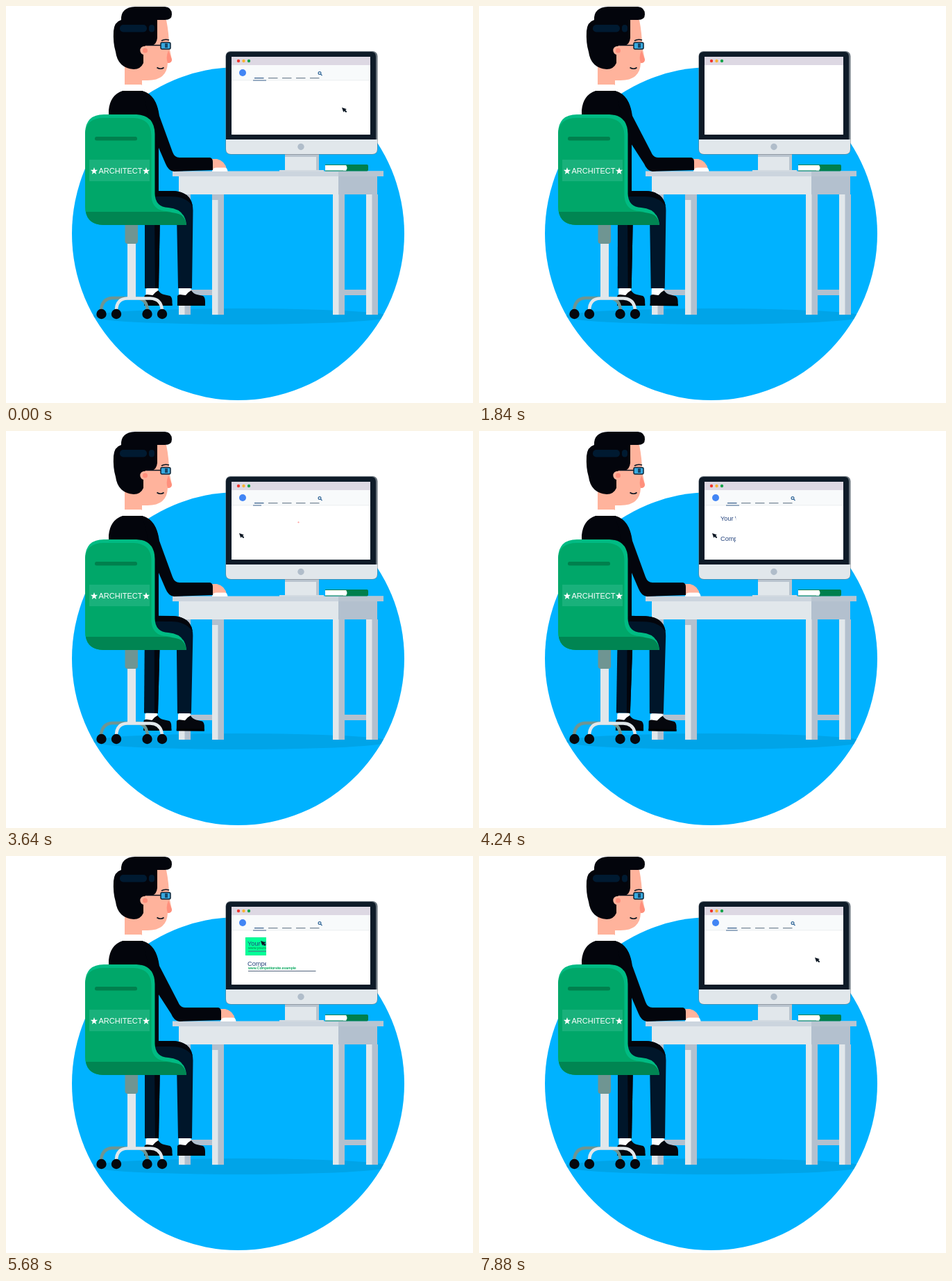
An HTML page that plays this animation: 673x571 px, repeating every 8000 ms.

```html
<!DOCTYPE html>
<html lang="en">
<head>
<meta charset="utf-8">
<title>Search results at a desk</title>
<style>
  html, body { margin: 0; width: 100%; height: 100%; overflow: hidden; background: #fff; }
  svg { display: block; width: 100vw; height: 100vh; }
  text { font-family: "Liberation Sans", Arial, sans-serif; }
  .title { font-size: 9.2px; fill: #24437c; }
  .url { font-size: 5.35px; fill: #00a65a; stroke: #00a65a; stroke-width: .12; }
  .rule { fill: #52647c; }
</style>
</head>
<body>
<svg viewBox="0 0 673 571" preserveAspectRatio="none">
  <defs>
    <clipPath id="disc"><circle cx="334.5" cy="327.5" r="239.5"/></clipPath>
    <clipPath id="screen"><rect x="325" y="73" width="200" height="112"/></clipPath>
    <clipPath id="headerClip"><rect id="headerEdge" x="325" y="85" width="200" height="24"/></clipPath>
    <path id="star" d="M0-5.4 1.3-1.7H5.2L2.1.7 3.2 4.4 0 2.2-3.2 4.4-2.1.7-5.2-1.7H-1.3Z" fill="#fff"/>
    <g id="deskLeg">
      <rect width="9" height="173" fill="#e1e7eb"/>
      <rect x="8.5" width="8.5" height="173" fill="#b3c0ce"/>
    </g>
    <g id="shoe">
      <rect x="2" y="406" width="18" height="12" rx="2" fill="#fff"/>
      <path d="M0 417Q1 415 4 415L12 416Q16 411 20 409Q23 414 28 415L37 417Q40 419 40 425V431H0Z" fill="#05070d"/>
      <path d="M0 428H40V431H0Z" fill="#000"/>
    </g>
  </defs>

  <circle cx="334.5" cy="327.5" r="239.5" fill="#00b2ff"/>
  <ellipse cx="338" cy="446.5" rx="214" ry="11.5" fill="#00a4e8" clip-path="url(#disc)"/>

  <!-- desk -->
  <path d="M266 408H297V416H266ZM488 408H519V416H488Z" fill="#b3c0ce"/>
  <use href="#deskLeg" x="249" y="271"/>
  <use href="#deskLeg" x="297" y="271"/>
  <use href="#deskLeg" x="471" y="271"/>
  <use href="#deskLeg" x="519" y="271"/>
  <path d="M297 271H306V279H297Z" fill="#b3c0ce"/>
  <rect x="249" y="244" width="231" height="27" fill="#e1e7eb"/>
  <rect x="479" y="244" width="56" height="27" fill="#b3c0ce"/>
  <rect x="240" y="237.5" width="304" height="7.5" fill="#ccd5de"/>
  <rect x="479" y="237.5" width="65" height="7.5" fill="#b9c5d1"/>

  <!-- monitor -->
  <rect x="402" y="212" width="49" height="25.5" fill="#e1e7eb"/>
  <path d="M402 212H451V237.500H447V217H402Z" fill="#b9c4ce"/>
  <rect x="394" y="236" width="64" height="2" fill="#d3dae1"/>
  <rect x="316.500" y="65" width="219" height="148.500" rx="7" fill="#6a747d"/>
  <path d="M317 193V73Q317 66 324 66H527Q533 66 533 73V193Z" fill="#0e1b28"/>
  <path d="M317 192H535V206Q535 213 528 213H324Q317 213 317 206Z" fill="#e1e7eb"/>
  <circle cx="425" cy="202.500" r="4.700" fill="#b0bdca"/>
  <rect x="325" y="73" width="200" height="112" fill="#fff"/>
  <rect x="325" y="73" width="200" height="12" fill="#ddd8e3"/>
  <circle cx="335" cy="79" r="2.200" fill="#f0372f"/>
  <circle cx="342.500" cy="79" r="2.200" fill="#f9b233"/>
  <circle cx="350" cy="79" r="2.200" fill="#16a34a"/>

  <g clip-path="url(#screen)">
    <g clip-path="url(#headerClip)">
      <rect x="325" y="85" width="200" height="22" fill="#f8fafb"/>
      <rect x="325" y="106.500" width="200" height=".8" fill="#e7ebee"/>
      <circle cx="341" cy="96" r="5" fill="#4285f4"/>
      <g id="tabs"></g>
      <g fill="none" stroke="#2d6496" stroke-width="1.200">
        <circle cx="452" cy="96.500" r="1.900"/><path d="M453.400 98 455.500 100"/>
      </g>
    </g>
    <rect id="underline" x="356" y="106.500" height="1" fill="#3f6590"/>
    <g id="results"></g>
    <path id="cursor" d="M0 0 6.800 2.300 5.200 3.600 7.300 6 5.900 7.300 3.700 5 2.300 6.700Z" fill="#0b1622"/>
    <g id="cross">
      <circle r="31.500" fill="#ff413f"/>
      <g fill="#fff" transform="rotate(45)">
        <rect x="-20" y="-6.500" width="40" height="13" rx="2"/>
        <rect x="-6.500" y="-20" width="13" height="40" rx="2"/>
      </g>
    </g>
    <g id="check">
      <circle r="31.500" fill="#00d887"/>
      <path d="M-16 1-5 12 16-10" fill="none" stroke="#fff" stroke-width="9"/>
    </g>
  </g>

  <!-- book -->
  <path d="M460 228.500H493V237H460Z" fill="#fff"/>
  <rect x="490" y="228" width="32" height="9.500" rx="2" fill="#007f4c"/>
  <path d="M460 228H492V229H460ZM460 236.500H492V237.500H460Z" fill="#007f4c"/>
  <path d="M486 229H490Q493 233 490 236.500H486Z" fill="#fff"/>

  <!-- head -->
  <path d="M171 80H196V114H171Z" fill="#ffb39c"/>
  <path d="M190 20H231Q235 40 235 58L239 77Q239 82 233 82Q232 107 204 107H190Z" fill="#ffb39c"/>
  <path d="M234 64 239 77Q239 82 233 82Q230 74 234 64Z" fill="#ff8f7c"/>
  <path d="M166 20Q165 2 186 1H229Q239 2 239 12Q239 20 229 20H218V46Q217 56 209 57Q203 54 198 60V82Q194 91 184 91Q161 89 158 66Q154 53 155 36Q156 23 166 20Z" fill="#03050c"/>
  <rect x="164" y="27" width="39" height="10.500" rx="5" fill="#001a31"/>
  <rect x="206" y="27" width="8" height="10.500" rx="4" fill="#001a31"/>
  <circle cx="199.500" cy="64" r="6.200" fill="#ffb39c"/>
  <circle cx="200.500" cy="64" r="3.500" fill="#ff8f7c"/>
  <path d="M202 56.500H223M224 50Q229 47 235 49M217.500 88.500Q223 92 227.500 88.500" fill="none" stroke="#0a1420" stroke-width="1.600"/>
  <rect x="223" y="52.500" width="14" height="9.500" rx="2" fill="#38a9df" stroke="#0b2538" stroke-width="1.500"/>
  <path d="M229 54H233V60H229Z" fill="#17496b"/>

  <!-- body -->
  <path d="M166 113H195L202 123H162Z" fill="#fff"/>
  <path d="M148 165V150Q150 128 168 122H196Q218 128 220 158V270H160Z" fill="#03050c"/>
  <g id="hand">
    <path d="M296 220H304Q316 223 318 235H296Z" fill="#ffb39c"/>
    <path d="M297 238Q297 232.500 304 232.500H316Q319 233 319.500 238Z" fill="#fff"/>
  </g>
  <path id="arm" fill="#03050c"/>

  <!-- legs -->
  <g id="legs">
    <path d="M200 300H222L220 406H200Z" fill="#00162a"/>
    <path d="M214 300H222L220 406H215Z" fill="#03050c"/>
    <use href="#shoe" x="199.500"/>
    <path d="M200 266H240Q269 267 269.500 294L268 406H248L246 300 200 296Z" fill="#00162a"/>
    <path d="M200 266H240Q266 267 269 288Q260 274 238 274H200Z" fill="#03050c"/>
    <use href="#shoe" x="247"/>
  </g>

  <!-- chair -->
  <g fill="none" stroke-width="4.500">
    <path d="M137 438Q138 421 153 420H190Q203 422 204 438" stroke="#6f9592"/>
    <path d="M159 438Q159 421 175 420.500H208Q224 421 225 438" stroke="#e1e7eb"/>
  </g>
  <rect x="175" y="338" width="12" height="82" fill="#e1e7eb"/>
  <rect x="171.500" y="310" width="18.500" height="32" rx="4" fill="#6f9592"/>
  <g fill="#05070d">
    <circle cx="137.500" cy="443" r="7.200"/><circle cx="159" cy="443" r="7.200"/>
    <circle cx="203.500" cy="443" r="7.200"/><circle cx="225" cy="443" r="7.200"/>
  </g>
  <path d="M114 182Q115 156 141 156H188Q214 157 214.500 184V270Q215 289 234 290Q258 292 260 315H140Q114 314 114 288Z" fill="#00bb83"/>
  <path d="M114 184Q115 161 141 161H184Q209 162 209.500 186V274Q211 294 231 295Q251 297 254 315H140Q114 314 114 288Z" fill="#00a769"/>
  <path d="M115 296H231Q251 298 254 302Q259 307 260 315H140Q118 314 115 296Z" fill="#008552"/>
  <rect x="128" y="188" width="61" height="5.500" rx="2.500" fill="#00804d"/>
  <rect x="120" y="221" width="87" height="31" fill="#19b17b"/>
  <use href="#star" x="127" y="237.500"/>
  <use href="#star" x="202" y="237.500"/>
  <text x="133.500" y="241" font-size="11" fill="#fff">ARCHITECT</text>
</svg>

<script>
const LOOP = 8000, ACT = 4200;
const LEFT = 345, SPAN = 123;
const $ = id => document.getElementById(id);
const ramp = (t, from, to) => Math.min(1, Math.max(0, (t - from) / (to - from)));
const smooth = x => x * x * (3 - 2 * x);
const inBack = x => 2.7 * x ** 3 - 1.7 * x ** 2;
const outBack = x => 1 - inBack(1 - x);
const mix = (a, b, x) => a + (b - a) * x;
const show = (id, on) => $(id).setAttribute('visibility', on ? 'visible' : 'hidden');

const acts = [
  { icon: 'cross', pop: 1960, cursor: [484, 146], fill: '#ffe4e1', stroke: '#ff5a52' },
  { icon: 'check', pop: 1760, cursor: [336, 147], fill: '#00ff99', stroke: '#00f08f' }
];
const sites = [
  ['Competitor Website', 'www.Competitorsite.example'],
  ['Your Website', 'www.yoursite.example']
];

// Each part wipes in and out horizontally at its own times.
const parts = {
  box:    { in: [740, 900], out: [1360, 1520] },
  title0: { in: [0, 200],   out: [1360, 1520] },
  url0:   { in: [40, 240],  out: [1360, 1520] },
  rule0:  { in: [80, 320],  out: [1360, 1520] },
  title1: { in: [0, 200],   out: [1360, 1520] },
  url1:   { in: [40, 240],  out: [1480, 1640] },
  rule1:  { in: [80, 320],  out: [1480, 1640] }
};

function shapeFor(name) {
  if (name === 'box') return '<rect id="box" x="345.5" y="117.500" width="122" height="25"/>';
  const kind = name.slice(0, -1), y = name.endsWith('1') ? 28.5 : 0;
  if (kind === 'rule') return `<rect class="rule" x="349" y="${136.5 + y}" width="97.500" height="1"/>`;
  const [x, base] = kind === 'title' ? [348, 129] : [349, 134.3];
  return `<text id="${name}" class="${kind}" x="${x}" y="${base + y}"></text>`;
}

$('results').innerHTML = Object.keys(parts).map(name =>
  `<clipPath id="${name}Clip"><rect id="${name}Edge" x="${LEFT}" y="110" height="70"/></clipPath>
   <g clip-path="url(#${name}Clip)">${shapeFor(name)}</g>`).join('');

$('tabs').innerHTML = [0, 1, 2, 3, 4].map(i =>
  `<rect x="${358 + i * 20}" y="103" width="13.500" height="1.300" fill="${i ? '#7b8a99' : '#3f6590'}"/>`).join('');

let currentAct = -1;
function setAct(index) {
  if (index === currentAct) return;
  currentAct = index;
  const order = index ? [1, 0] : [0, 1];
  order.forEach((site, row) => {
    $('title' + row).textContent = sites[site][0];
    $('url' + row).textContent = sites[site][1];
  });
  $('box').setAttribute('fill', acts[index].fill);
  $('box').setAttribute('stroke', acts[index].stroke);
}

function drawScreen(u, index) {
  const act = acts[index];
  setAct(index);
  for (const [name, part] of Object.entries(parts)) {
    const open = Math.min(ramp(u, ...part.in), 1 - ramp(u, ...part.out));
    $(name + 'Edge').setAttribute('width', SPAN * open);
  }

  const away = 1 - ramp(u, 1560, 1720);
  $('headerEdge').setAttribute('width', 200 * Math.max(away, ramp(u, 3480, 3640)));
  $('underline').setAttribute('width', 19 * Math.max(away, ramp(u, 3540, 3700)));

  const returned = u >= 3520;
  const start = returned ? acts[1 - index].cursor : act.cursor;
  const move = returned ? 0 : smooth(ramp(u, 480, 740));
  $('cursor').setAttribute('transform',
    `translate(${mix(start[0], 367, move)} ${mix(start[1], 122, move)})`);
  show('cursor', u < 1520 || returned);

  const scale = u < 3480
    ? outBack(ramp(u, act.pop, act.pop + 360))
    : 1 - inBack(ramp(u, 3480, 3642));
  for (const { icon } of acts) show(icon, icon === act.icon && scale > 0.001);
  $(act.icon).setAttribute('transform', `translate(421.5 131.300) scale(${Math.max(scale, 0)})`);
}

function drawPerson(t) {
  const reach = ramp(t, 480, 640) - ramp(t, 2200, 2360) + ramp(t, 4680, 4840) - ramp(t, 6880, 7040);
  const d = 12 * reach, e = 8 * reach;
  $('arm').setAttribute('d', `M196 122C212 126 219 142 221 158L${240 + e} 210
    Q${243 + e} 218 ${250 + e} 218H${294 + d}Q${298 + d} 219 ${298 + d} 224V236
    L${242 + e} 238Q${234 + e} 237 ${230 + e} 227L214 190Z`);
  $('hand').setAttribute('transform', `translate(${d})`);

  const swing = t > 520 && t < 5640 ? (1 - Math.cos((t - 520) / 640 * 2 * Math.PI)) / 2 : 0;
  $('legs').setAttribute('transform', `rotate(${3.1 * swing} 225 275)`);
}

function draw(t) {
  const index = t < ACT ? 0 : 1;
  drawScreen(t - index * ACT, index);
  drawPerson(t);
}

const begin = performance.now();
function tick() {
  draw((performance.now() - begin) % LOOP);
  requestAnimationFrame(tick);
}
draw(0);
requestAnimationFrame(tick);
</script>
</body>
</html>
```
